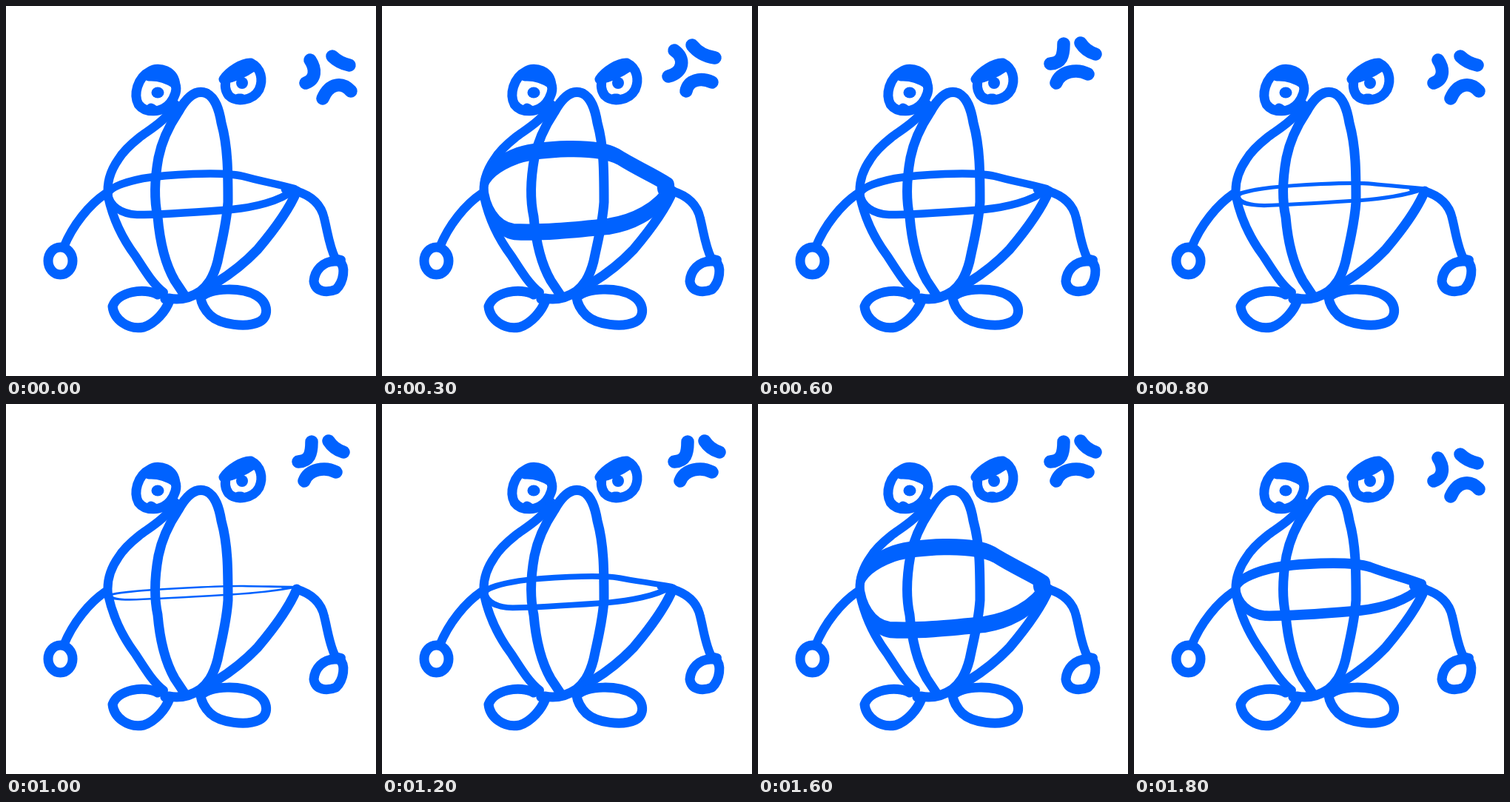
Animation, 500 px wide and 500 px high, one loop 1900 ms. Source, as an HTML page:

```html
<!DOCTYPE html>
<html lang="en">
<head>
<meta charset="utf-8">
<title>Angry globe</title>
<style>
  html, body { margin: 0; height: 100%; overflow: hidden; background: #fff; }
  svg { display: block; width: 100vw; height: 100vh; }
  path, ellipse { fill: none; stroke: #0062ff; stroke-linecap: round; stroke-linejoin: round; }
  .dot { fill: #0062ff; stroke: none; }
</style>
</head>
<body>
<svg viewBox="0 0 500 500">
  <g stroke-width="13">
    <!-- eyes -->
    <path d="M229 108C228 87 206 81 195 88C177 97 172 120 179 133C188 145 211 145 222 131C230 120 231 112 229 106M193 95Q212 94 228 105M196 138L198 139"/>
    <ellipse class="dot" cx="205" cy="117" rx="8.500" ry="7.500"/>
    <path d="M294 99C301 88 320 76 331 77C345 84 348 100 342 113C334 128 311 131 301 121C295 113 296 104 298 98M294 99Q314 96 334 82M314 125L318 125"/>
    <ellipse class="dot" cx="319" cy="104" rx="8" ry="8"/>
    <!-- body -->
    <path d="M229 133C217 154 196 166 181 177C166 189 158 197 152 207C140 224 136 242 138 258C145 290 160 318 175 338C188 358 198 375 213 387" stroke-width="12"/>
    <path d="M271 118C256 112 243 125 233 143C217 167 209 190 206 205C200 238 200 262 205 285C208 320 216 350 228 371L242 392"/>
    <path d="M271 118C283 124 288 140 291 158C300 190 300 225 300 265C298 295 291 320 286 345C280 368 272 378 262 386C250 394 236 398 220 395"/>
    <path d="M393 250C384 272 362 303 340 329C320 350 302 363 284 374L262 388"/>
    <!-- arms -->
    <path d="M134 254C113 268 90 296 78 326" stroke-width="12"/>
    <ellipse cx="73.500" cy="344.500" rx="16.500" ry="18.500"/>
    <path d="M392 250C412 256 426 268 430 287C435 307 437 325 445 341L453 343" stroke-width="12"/>
    <path d="M446 345C428 344 417 358 416 372C418 387 434 388 446 383C457 372 459 352 451 346"/>
    <!-- feet -->
    <path d="M205 390C187 380 151 386 144 406C146 424 165 438 186 434C202 429 216 412 221 398L215 396"/>
    <path d="M263 394C278 380 318 380 338 391C356 402 355 421 342 427C325 435 290 431 276 418C269 411 264 402 263 394Z"/>
  </g>
  <path id="mouth" stroke-width="10.500" d="M377 248L390 247C365 240 345 237 320 230C290 223 215 228 185 233C160 238 140 245 138 254C140 270 155 281 177 282C215 282 265 278 305 275C335 272 370 264 388 249"/>
  <path id="mark" stroke-width="17.500"/>
</svg>
<script>
  const STEP = 100, COUNT = 19;
  // Mouth sizes from closed to wide open: [scale across its tilted axis, centre y]
  const mouthSizes = [[.24, 254], [.49, 253.5], [.74, 253.5], [1, 254], [1.31, 251], [1.64, 248], [2.12, 251]];
  const [right, left, up] = [
    'M411 73C419 85 419 99 405 104M441 68Q450 77 464 80M428 125C437 104 454 102 466 115',
    'M395 60C410 70 408 90 387 95M419 53Q430 67 450 70M411 115C414 100 430 96 446 103',
    'M413 51C413 68 410 77 395 78M436 50Q443 61 456 65M403 104C409 88 431 84 446 92'
  ];
  const markPoses = [right, left, up, left];
  const mouth = document.getElementById('mouth');
  const mark = document.getElementById('mark');

  function draw(now) {
    const i = Math.floor(now / STEP) % COUNT;
    // The closed mouth is held for one extra step
    const swing = (i > 9 ? i + 2 : i + 3) % 12;
    const [scale, y] = mouthSizes[6 - Math.abs(swing - 6)];
    mouth.setAttribute('transform',
      `translate(264 ${y}) rotate(-3) scale(1 ${scale}) rotate(3) translate(-264 -254)`);
    mark.setAttribute('d', markPoses[(i > 11 ? i + 2 : i) % 4]);
  }

  const start = performance.now();
  function tick() {
    draw(performance.now() - start);
    requestAnimationFrame(tick);
  }
  tick();
</script>
</body>
</html>
```
